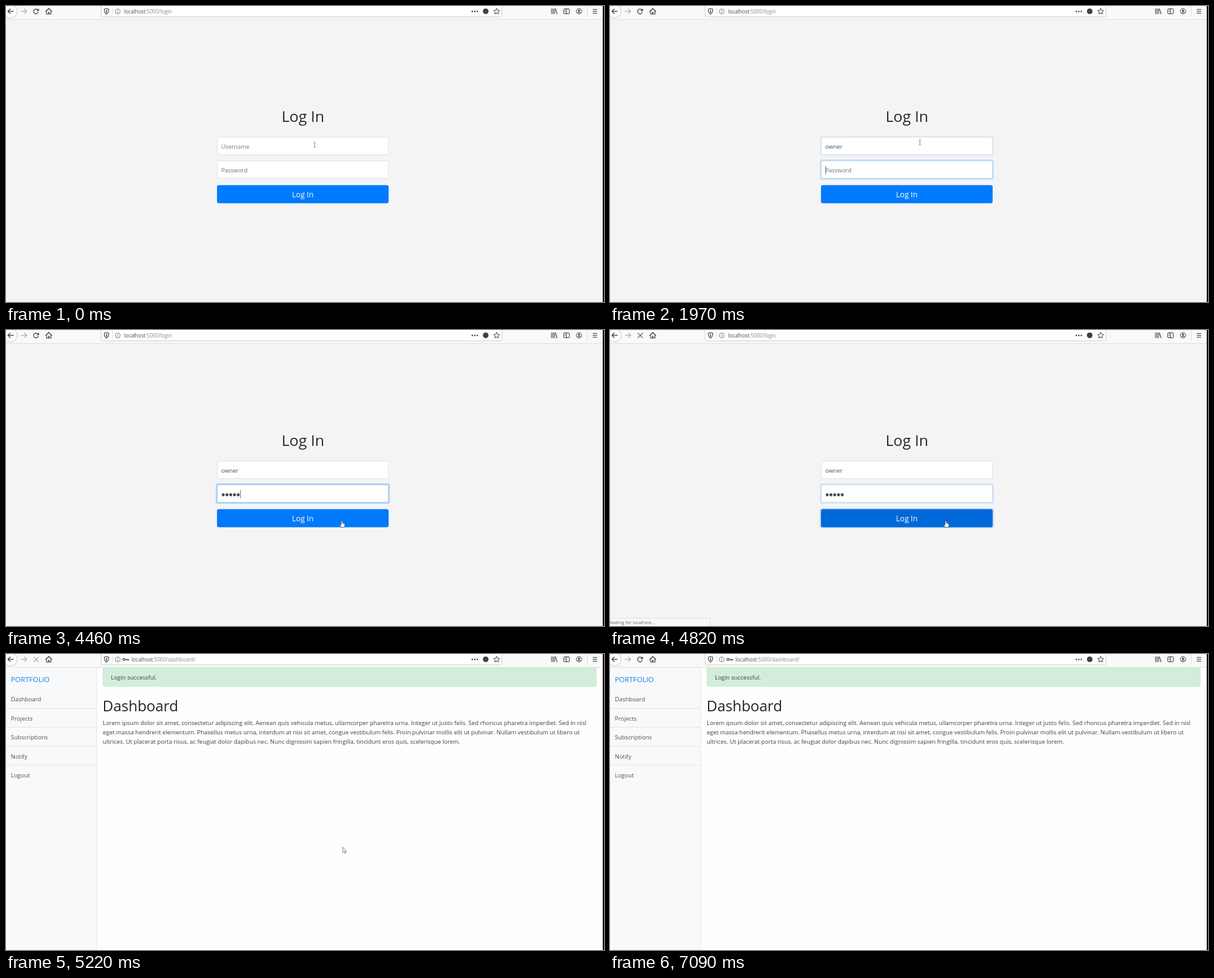
Animation, 958 px wide and 475 px high, one loop 7.32 s. Source, as an HTML page with a canvas:

```html
<!DOCTYPE html>
<html lang="en">
<head>
<meta charset="utf-8">
<title>Log In</title>
<style>
  html, body { margin: 0; width: 100%; height: 100%; overflow: hidden; background: #f4f4f4; }
  canvas { display: block; width: 958px; height: 475px; }
</style>
</head>
<body>
<canvas id="stage" width="958" height="475"></canvas>
<script>
const ctx = document.getElementById('stage').getContext('2d', { alpha: false });
const LOOP = 7320;
const FONT = '"Open Sans", "Noto Sans", sans-serif';
const BODY = 9.41;
const INK = '#3f4144';
const USER = 'owner';
const LOREM = [
  'Lorem ipsum dolor sit amet, consectetur adipiscing elit. Aenean quis vehicula metus, ullamcorper pharetra urna. Integer ut justo felis. Sed rhoncus pharetra imperdiet. Sed in nisl',
  'eget massa hendrerit elementum. Phasellus metus urna, interdum at nisi sit amet, congue vestibulum felis. Proin pulvinar mollis elit ut pulvinar. Nullam vestibulum ut libero ut',
  'ultrices. Ut placerat porta risus, ac feugiat dolor dapibus nec. Nunc dignissim sapien fringilla, tincidunt eros quis, scelerisque lorem.'
];

// Value of the latest [time, value] key at or before t.
const held = (t, keys) => keys.reduce((value, key) => (t >= key[0] ? key[1] : value), keys[0][1]);

function text(str, x, y, size, color, align = 'left') {
  ctx.font = `${size}px ${FONT}`;
  ctx.textAlign = align;
  ctx.fillStyle = color;
  ctx.fillText(str, x, y);
}

function rect(x, y, w, h, color) {
  ctx.fillStyle = color;
  ctx.fillRect(x, y, w, h);
}

function paint(fill, stroke, width = 1) {
  if (fill) { ctx.fillStyle = fill; ctx.fill(); }
  if (stroke) { ctx.strokeStyle = stroke; ctx.lineWidth = width; ctx.stroke(); }
}

function roundRect(x, y, w, h, r, fill, stroke) {
  ctx.beginPath();
  ctx.roundRect(x, y, w, h, r);
  paint(fill, stroke);
}

function circle(x, y, r, fill, stroke, width) {
  ctx.beginPath();
  ctx.arc(x, y, r, 0, Math.PI * 2);
  paint(fill, stroke, width);
}

function shape(points, fill, stroke, width, closed = true) {
  ctx.beginPath();
  points.forEach(([x, y]) => ctx.lineTo(x, y));
  if (closed) ctx.closePath();
  paint(fill, stroke, width);
}

const line = (points, color, width = 1) => shape(points, null, color, width, false);

function arrowIcon(x, dir, color) {
  line([[x - 4.5 * dir, 8.5], [x + 4.5 * dir, 8.5]], color, 1.3);
  line([[x + 0.7 * dir, 4.5], [x + 4.7 * dir, 8.5], [x + 0.7 * dir, 12.5]], color, 1.3);
}

function reloadIcon(color) {
  ctx.beginPath();
  ctx.arc(48, 8.7, 3.8, 0.3, Math.PI * 1.78);
  paint(null, color, 1.3);
  shape([[52.8, 4], [52.8, 8.2], [48.8, 8.2]], color);
}

function stopIcon(color) {
  line([[44.4, 4.6], [52.6, 12.8]], color, 1.2);
  line([[52.6, 4.6], [44.4, 12.8]], color, 1.2);
}

function star(cx, cy, r) {
  shape(Array.from({ length: 10 }, (_, i) => {
    const a = Math.PI * (i / 5 - 0.5), d = i % 2 ? r * 0.48 : r;
    return [cx + d * Math.cos(a), cy + d * Math.sin(a)];
  }), null, INK, 1);
}

function urlBar(t) {
  roundRect(152.5, -4.5, 642, 22, 2, '#fff', '#cfcfd1');
  rect(170, 2, 1, 13, '#dedede');
  ctx.beginPath();
  ctx.moveTo(161, 4);
  ctx.lineTo(164.6, 5.2);
  ctx.quadraticCurveTo(164.8, 10.5, 161, 13);
  ctx.quadraticCurveTo(157.2, 10.5, 157.4, 5.2);
  ctx.closePath();
  paint(null, INK, 1.1);
  line([[161, 6.3], [161, 10.8]], INK, 1.4);

  circle(179, 8.7, 4, null, '#747476', 0.9);
  rect(178.5, 6.3, 1, 1, '#747476');
  rect(178.5, 8, 1, 3, '#747476');

  const loaded = t >= 4960;
  const x = loaded ? 201 : 189;
  if (loaded) {
    circle(189, 8.8, 1.7, null, INK, 1.2);
    line([[190.8, 8.8], [197, 8.8]], INK, 1.3);
    line([[194, 8.8], [194, 10.8]], INK, 1);
    line([[196.3, 8.8], [196.3, 10.8]], INK, 1);
  }
  text('localhost', x, 12, 8.2, '#48484a');
  const hostWidth = ctx.measureText('localhost').width;
  text(loaded ? ':5000/dashboard/' : ':5000/login', x + hostWidth, 12, 8.2, '#89898b');

  [747, 751, 755].forEach(dotX => circle(dotX, 8.7, 1.2, INK));
  circle(768.5, 8.5, 4.5, INK);
  star(786, 8.8, 5);
}

function toolbar(t) {
  rect(0, 0, 956, 21, '#f9f9fa');
  rect(0, 21, 956, 1, '#e2e2e3');
  circle(7.5, 8.5, 10.7, '#fcfcfc', '#c5c5c6', 1);
  arrowIcon(7.8, -1, INK);
  arrowIcon(28.5, 1, '#b2b2b4');

  if (t < 4820) reloadIcon(INK);
  else if (t < 5220) stopIcon('#5c5c5e');
  else if (t < 5480) stopIcon('#a5a5a7');
  else reloadIcon(held(t, [[5480, '#cbcbcd'], [5580, '#a9a9ab'], [5830, INK]]));

  line([[63.3, 9], [68.5, 4], [73.7, 9]], INK, 1.3);
  line([[65, 8.2], [65, 13], [72, 13], [72, 8.2]], INK, 1.2);
  rect(67.5, 9.3, 2, 3.5, INK);

  urlBar(t);

  [874, 876.4, 878.8].forEach(x => line([[x, 4], [x, 13]], INK, 1.1));
  line([[880, 4.3], [883, 13]], INK, 1.1);
  roundRect(893.5, 4.5, 9, 8, 1.5, null, INK);
  line([[897.5, 4.5], [897.5, 12.5]], INK);
  line([[895, 7], [896.5, 7]], INK, 0.8);
  line([[895, 9], [896.5, 9]], INK, 0.8);
  circle(918, 8.5, 4.3, null, INK, 1);
  circle(918, 7.3, 1.6, INK);
  ctx.beginPath();
  ctx.ellipse(918, 11, 2.8, 1.6, 0, Math.PI, 0);
  paint(INK);
  rect(931, 0, 1, 18, '#dfdfe0');
  [5.5, 8.5, 11.5].forEach(y => line([[940, y], [947, y]], INK, 1.1));
}

function field(y, focus) {
  if (focus) roundRect(336, y - 2, 279, 33, 3.5, `rgba(0,123,255,${0.25 * focus})`);
  roundRect(338.5, y + 0.5, 274, 28, 2, '#fff', '#dfe2e5');
  if (focus) roundRect(338.5, y + 0.5, 274, 28, 2, null, `rgba(155,203,255,${focus})`);
}

function caret(x, y) {
  rect(x, y, 1, 13, '#77797c');
}

function login(t) {
  rect(0, 22, 956, 453, '#f4f4f4');
  text('Log In', 475.7, 186, 24.3, '#24282c', 'center');

  field(210, held(t, [[0, 0], [220, 0.5], [340, 1], [1970, 0.2], [2090, 0]]));
  const typed = USER.slice(0, held(t, [[0, 0], [970, 1], [1220, 2], [1340, 3], [1720, 5]]));
  text(typed || 'Username', 344.7, 229, BODY, typed ? '#495057' : '#737b83');
  if ((t >= 80 && t < 590) || (t >= 970 && t < 1970)) {
    caret(345 + Math.round(typed ? ctx.measureText(typed).width : 0), 218);
  }

  field(248, held(t, [[0, 0], [1970, 0.65], [2090, 1], [4820, 0.4], [4960, 0]]));
  const dots = held(t, [[0, 0], [2360, 1], [2590, 2], [2730, 3], [2980, 4], [3230, 5]]);
  if (!dots) text('Password', 344.7, 267, BODY, '#68727b');
  for (let i = 0; i < dots; i++) circle(348 + 6 * i, 264.5, 2.4, '#494d51');
  if ((t >= 1970 && t < 3470) || (t >= 3970 && t < 4820)) caret(345 + 6 * dots, 257);

  const ring = held(t, [[0, 0], [4820, 0.5], [4960, 1]]);
  if (ring) roundRect(336, 286, 279, 32, 4, `rgba(38,143,255,${0.5 * ring})`);
  const blue = held(t, [[0, '#007bff'], [4460, '#0079fb'], [4570, '#0069d9']]);
  roundRect(338, 287.5, 275, 29, 3, blue);
  text('Log In', 475.5, 307, 12.2, '#fff', 'center');

  if (t >= 4820) {
    roundRect(-4.5, 462.5, 165, 20, 2, '#f9f9fa', '#dededf');
    text('Waiting for localhost...', -2, 472, 7.2, '#66676a');
  }
}

function dashboard() {
  rect(0, 22, 956, 453, '#fefefe');
  rect(0, 22, 145, 453, '#f8f9fa');
  rect(145, 22, 1, 453, '#e6e9ec');
  text('PORTFOLIO', 7.7, 45, 11.5, '#157ff3');
  ['Dashboard', 'Projects', 'Subscriptions', 'Notify', 'Logout'].forEach((label, i) => {
    text(label, 7.8, Math.round(76.2 + 30.5 * i), BODY, '#4c5050');
    if (i < 4) rect(0, Math.round(87 + 30.4 * i), 145, 1, '#e2e5e9');
  });
  text('Login successful.', 168, 41, BODY, '#2d4634');
  text('Dashboard', 154.8, 92, 23.5, '#212529');
  LOREM.forEach((row, i) => text(row, 155, 114 + 15 * i, BODY, '#3b3f43'));
}

function alertBox() {
  roundRect(155.5, 21.5, 790, 30.5, 2.5, '#d4edda', '#cae8d2');
}

function beam(x, y) {
  line([[x + 0.5, y - 4], [x + 0.5, y + 4]], '#8a8a8a');
  [-4, 4].forEach(dy => line([[x - 1.5, y + dy], [x + 2.5, y + dy]], '#a0a0a0', 0.9));
}

function hand(x, y) {
  shape([[-1, 1], [0, 0], [1, 1], [1.2, 4], [3.8, 4.6], [5, 6], [4.6, 8.5], [3.8, 10.6],
    [-0.8, 10.6], [-3.6, 7], [-3, 6], [-1, 7.2]].map(([dx, dy]) => [x + dx, y + dy]), '#fff', '#33475c', 0.7);
}

function pointer(x, y) {
  shape([[0, 0], [0, 8.6], [2, 6.9], [3.4, 10], [4.7, 9.4], [3.4, 6.5], [5.8, 6.3]]
    .map(([dx, dy]) => [x + dx, y + dy]), '#fff', '#6c6c6e', 0.8);
}

function cursor(t) {
  if (t < 4350) {
    beam(...held(t, [[0, [494, 223]], [80, [496, 219]], [4090, [498, 224]], [4210, [502, 239]]]));
  } else if (t < 5080) {
    hand(...held(t, [[4350, [528, 294]], [4460, [538, 306]]]));
  } else if (t < 6330) {
    pointer(539.5, 310);
  } else if (t < 7090) {
    const p = t < 6470 ? 0 : (Math.floor((t - 6470) / 124) + 1) / 5;
    const eased = 0.35 * p + 0.65 * p * p * (3 - 2 * p);
    pointer(577.5 + 350 * eased, 328 + 138 * eased);
  }
}

function draw() {
  const t = performance.now() % LOOP;
  toolbar(t);
  if (t < 5220) {
    login(t);
  } else {
    rect(146, 22, 810, 453, '#fefefe');
    dashboardPage();
  }
  cursor(t);
  rect(956, 0, 2, 475, '#000');
  requestAnimationFrame(draw);
}

function dashboardPage() {
  rect(0, 22, 956, 453, '#fefefe');
  alertBox();
  ctx.save();
  ctx.beginPath();
  ctx.rect(0, 22, 146, 453);
  ctx.rect(146, 53, 810, 422);
  ctx.clip();
  dashboard();
  ctx.restore();
  text('Login successful.', 168, 41, BODY, '#2d4634');
}
draw();
</script>
</body>
</html>
```
